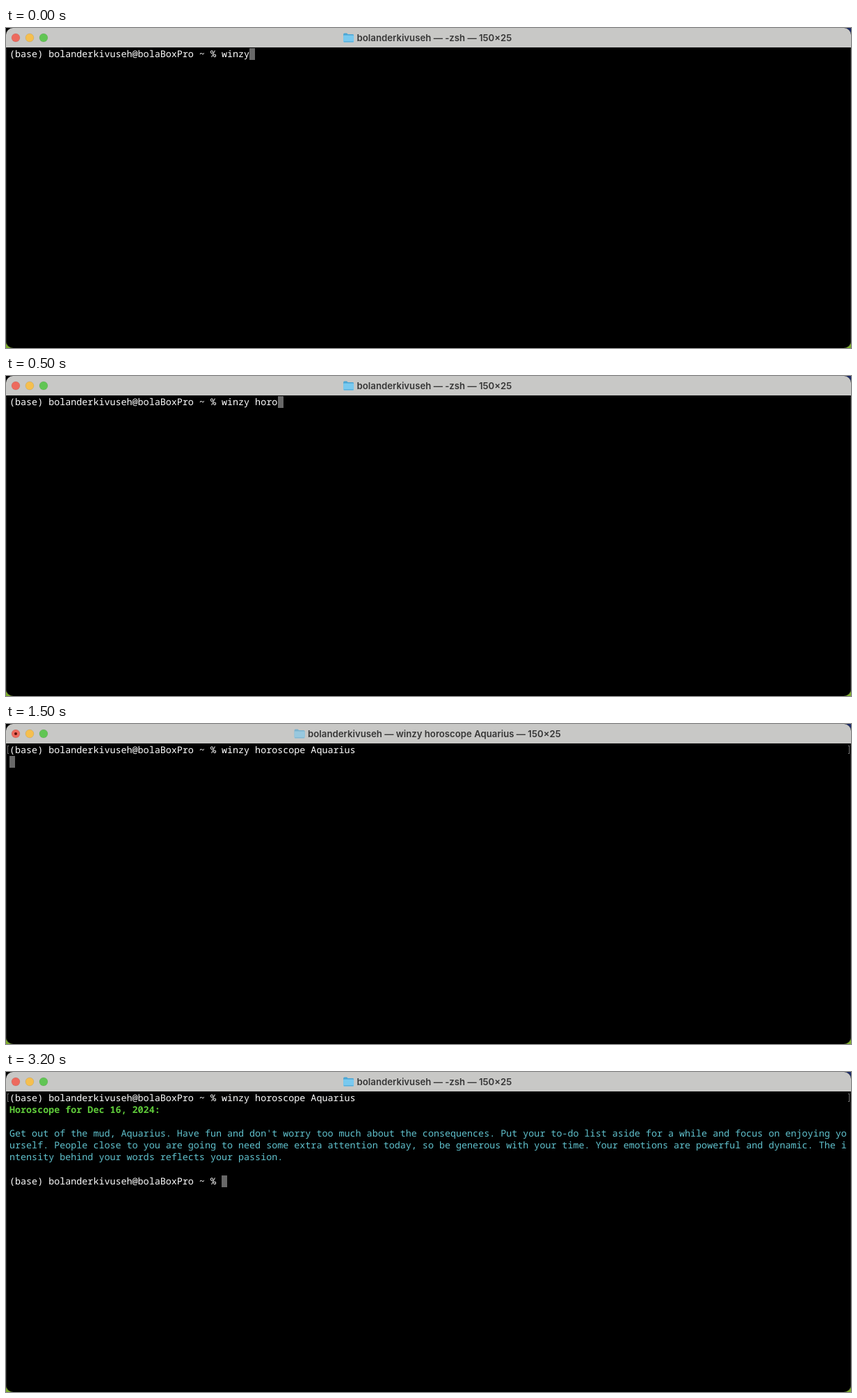
An HTML page for the animation above (4000 ms loop, 1215 px wide and 461 px high).

```html
<!DOCTYPE html>
<html lang="en">
<meta charset="utf-8">
<title>Terminal</title>
<style>
  html, body { margin: 0; width: 100%; height: 100%; overflow: hidden; }
  body {
    position: relative;
    background: linear-gradient(90deg, #000 50%, #1b2a66 50%) top / 100% 50% no-repeat, #7fae2e;
  }
  #window {
    position: absolute; inset: 0; overflow: hidden; border-radius: 10px;
    background: #000; box-shadow: inset 1px 0 #222, inset -1px 0 #222;
  }
  header { position: absolute; inset: 0 0 auto; height: 28px; background: #c8c8c6; }
  svg { position: absolute; left: 0; top: 0; }
  #title {
    position: absolute; left: 606px; top: 0; transform: translateX(-50%);
    display: flex; align-items: center; gap: 4px; height: 28px; white-space: pre;
    font: 600 13.2px Inter, sans-serif; color: #363636;
  }
  #title svg { position: static; }
  pre {
    position: absolute; left: 5px; top: 29px; margin: 0; color: #fff;
    font: 500 13.389px/17.1px "Noto Sans Mono", monospace; text-rendering: geometricPrecision;
  }
  .heading { color: #5fcb3a; font-weight: bold; }
  .reading { color: #61c3cf; }
  #cursor { position: absolute; width: 8px; height: 17px; background: #686868; }
  .mark { position: absolute; top: 31px; width: 2px; height: 12px; border: 1px solid #777; box-sizing: border-box; }
  .mark.left { left: 2px; border-right: 0; }
  .mark.right { left: 1211px; border-left: 0; }
</style>
<div id="window">
  <header>
    <svg width="70" height="28" stroke-opacity=".15" stroke="#000" stroke-width=".6">
      <circle cx="14" cy="14" r="6" fill="#ed6a5e"/>
      <circle cx="34" cy="14" r="6" fill="#f5bf4f"/>
      <circle cx="54" cy="14" r="6" fill="#61c554"/>
      <circle id="busy" cx="14" cy="14" r="2" fill="#5c0f08" stroke="none"/>
    </svg>
    <div id="title">
      <svg id="folder" width="16" height="14">
        <path d="M.5 2Q.5.5 2 .5h3.5L7 2h7q1.5 0 1.5 1.5V12H.5z" fill="#4ba6d4"/>
        <rect x=".5" y="3.5" width="15" height="10" rx="1.3" fill="#79c9ef"/>
        <path d="M1 12.8h14" stroke="#4ba6d4"/>
      </svg>
      <span id="caption"></span>
    </div>
  </header>
  <i class="mark left"></i><i class="mark right"></i>
  <div id="cursor"></div>
  <pre id="screen"></pre>
</div>
<script>
  const $ = id => document.getElementById(id);
  const USER = 'bolanderkivuseh';
  const PROMPT = `(base) ${USER}@bolaBoxPro ~ % `;
  const COMMAND = 'winzy horoscope Aquarius';
  const CELL = 8.033, ROW = 17.1, LOOP = 4000;
  const READING = `Get out of the mud, Aquarius. Have fun and don't worry too much about the consequences. Put your to-do list aside for a while and focus on enjoying yo
urself. People close to you are going to need some extra attention today, so be generous with your time. Your emotions are powerful and dynamic. The i
ntensity behind your words reflects your passion.`;
  const RESULT = `${PROMPT}${COMMAND}
<span class="heading">Horoscope for Dec 16, 2024:</span>

<span class="reading">${READING}</span>

${PROMPT}`;

  const typed = text => ({ html: PROMPT + text, col: PROMPT.length + text.length, row: 0 });
  const steps = [
    { at: 0, ...typed('winzy') },
    { at: 500, ...typed('winzy horo') },
    { at: 1000, ...typed(COMMAND + ' ') },
    { at: 1500, html: PROMPT + COMMAND, col: 0, row: 1, running: true, sent: true },
    { at: 2000, html: RESULT, col: PROMPT.length, row: 7, sent: true },
  ];

  function show({ html, col, row, running, sent }) {
    $('screen').innerHTML = html;
    $('caption').textContent = `${USER} — ${running ? COMMAND : '-zsh'} — 150×25`;
    $('cursor').style.left = Math.round(5 + col * CELL) + 'px';
    $('cursor').style.top = Math.round(29 + row * ROW) + 'px';
    $('busy').style.display = running ? '' : 'none';
    $('folder').style.opacity = running ? 0.6 : 1;
    for (const mark of document.querySelectorAll('.mark')) mark.hidden = !sent;
  }

  let current;
  function tick() {
    const time = performance.now() % LOOP;
    const step = steps.findLast(s => s.at <= time);
    if (step !== current) show(current = step);
    requestAnimationFrame(tick);
  }
  tick();
</script>
</html>
```
